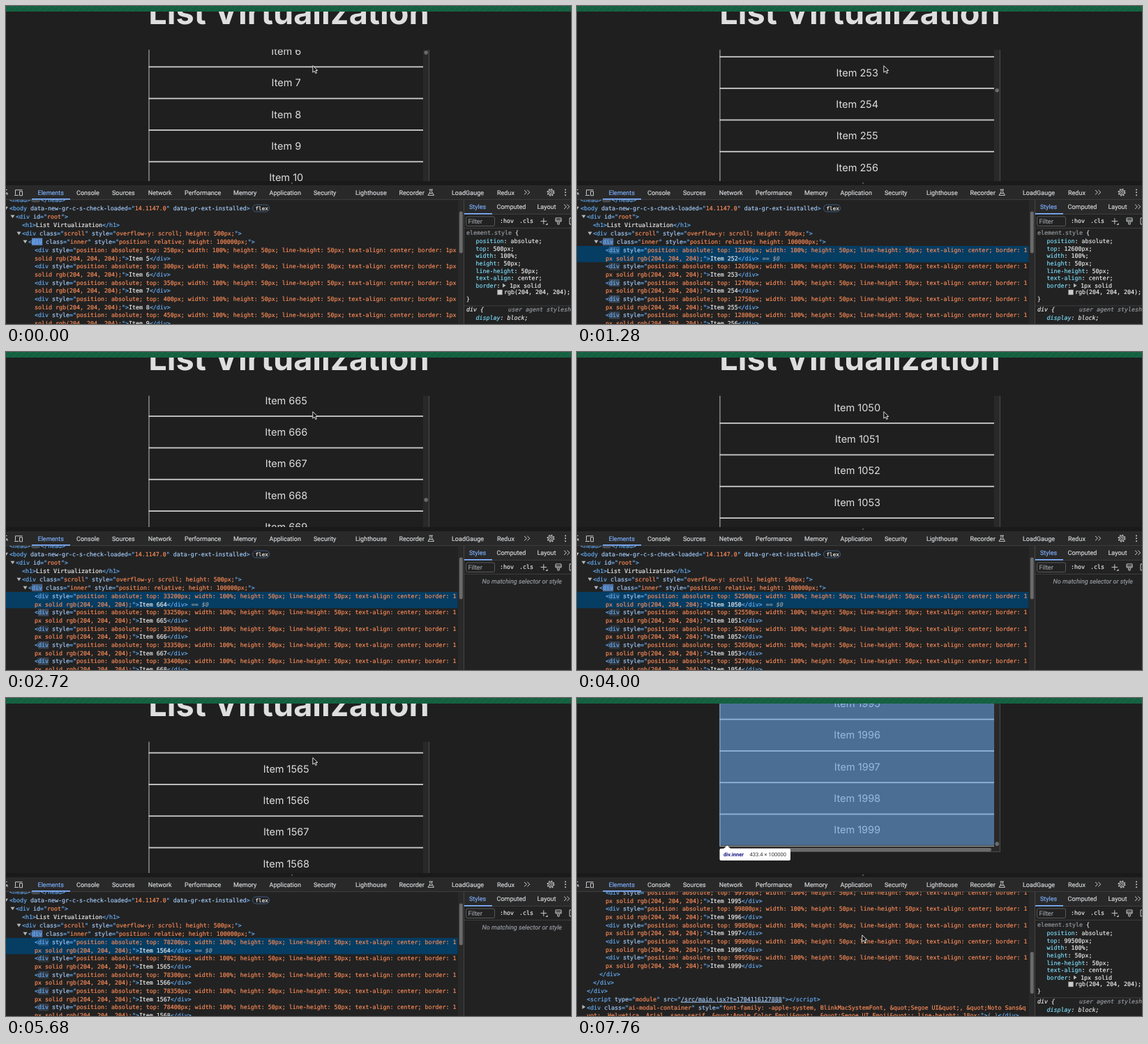
An HTML page for the animation above (7840 ms loop, 810 by 456 pixels).

```html
<!DOCTYPE html>
<html lang="en">
<head>
<meta charset="utf-8">
<title>List Virtualization</title>
<style>
  html, body { margin: 0; width: 100%; height: 100%; overflow: hidden; background: #1f1f1f; }
  svg { display: block; }
  text { white-space: pre; text-rendering: geometricPrecision; }
  .page { font-family: Inter, sans-serif; fill: #dedede; }
  .ui { font: 9.06px Roboto, sans-serif; --ink: #d6d8db; }
  .mono { font: 8.306px "DejaVu Sans Mono", monospace; --ink: #ededed; }
  .tag { --ink: #66aef7; }
  .attr { --ink: #a6cdfb; }
  .val { --ink: #fb8c59; }
  .prop { --ink: #7cdcf8; }
  .dim { --ink: #979ba0; }
  .link { --ink: #a6cdfb; text-decoration: underline; }
  .active { --ink: #7cacf8; }
  .ui, .mono, .mono tspan { fill: var(--ink); stroke: var(--ink); stroke-width: .18; }
  .it { font-style: italic; }
  .stroke { fill: none; stroke: #c7c9cc; stroke-width: 1; }
</style>
</head>
<body>
<svg id="stage" width="810" height="456" viewBox="0 0 810 456">
  <defs>
    <clipPath id="pageClip"><rect y="8" width="810" height="243"/></clipPath>
    <clipPath id="listClip"><rect id="listWindow" x="204" width="403" height="453.3"/></clipPath>
    <clipPath id="codeClip"><rect y="278" width="647.5" height="178"/></clipPath>
    <pattern id="weave" width="9" height="8" patternUnits="userSpaceOnUse">
      <path d="M0 8L9 0" stroke="#1b6b48" stroke-width="1"/>
    </pattern>
  </defs>
  <rect width="810" height="456" fill="#1f1f1f"/>
  <rect width="810" height="8" fill="#146040"/>
  <rect width="810" height="8" fill="url(#weave)"/>
  <g clip-path="url(#pageClip)">
    <g id="page">
      <text class="page" x="405.5" y="26.3" font-size="46.9" font-weight="700" text-anchor="middle">List Virtualization</text>
      <g id="list"></g>
    </g>
    <g id="overlay">
      <rect x="204.5" y="8" width="393.5" height="203.2" fill="#6aa3e5" opacity=".6"/>
      <path d="M210 216.5l5.3-5 5.3 5z" fill="#fff"/>
      <rect x="204.5" y="216" width="101.5" height="17" rx="2" fill="#fff"/>
      <text x="210" y="227.3" font-family="Roboto, sans-serif" font-size="7.6" font-weight="700" fill="#1a1a86">div.inner</text>
      <text x="247.5" y="227.3" font-family="Roboto, sans-serif" font-size="7.6" fill="#333">433.4 × 100000</text>
    </g>
  </g>
  <g id="panel"></g>
  <g clip-path="url(#codeClip)"><g id="code"></g></g>
  <rect id="codeThumb" x="649.8" width="5" height="60" rx="2.5" fill="#6a6a6a"/>
  <g id="styles"></g>
  <path id="cursor" d="M0 0V9.6L2.3 7.5L4 11L5.6 10.3L4.1 6.9H7Z" fill="#111" stroke="#f4f4f4" stroke-width=".9" stroke-linejoin="round"/>
</svg>
<script>
const LOOP = 7840, STEP = 80;
const PITCH = 45.33, LIST_TOP = 62.5, LAST_ITEM = 1999;
const ROW = 23.33, LINE = 12, COLUMNS = 121;

// time, list position in items, row offset of the element tree
const KEYS = [
  [0, 5.952, 0], [1280, 252.272, 0], [2720, 664.846, 0], [4000, 1049.625, 1],
  [4800, 1320.343, 0], [6640, 1822.857, -1], [7200, 1989.7, 1]
];

const $ = id => document.getElementById(id);
const clamp01 = x => Math.max(0, Math.min(1, x));
const mix = (a, b, p) => a + (b - a) * p;
const smooth = (t, from, to) => {
  const p = clamp01((t - from) / (to - from));
  return p * p * (3 - 2 * p);
};
const noise = n => {
  const v = Math.sin(n * 12.9898) * 43758.5453;
  return v - Math.floor(v);
};
const escapeText = s => s.replace(/&/g, '&amp;').replace(/</g, '&lt;');
const text = (cls, x, y, s, extra = '') => `<text class="${cls}" x="${x}" y="${y}" ${extra}>${escapeText(s)}</text>`;
const rect = (x, y, w, h, fill, extra = '') =>
  `<rect x="${x}" y="${y}" width="${w}" height="${h}" fill="${fill}" ${extra}/>`;
const path = (d, extra = 'class="stroke"') => `<path d="${d}" ${extra}/>`;
const arrowDown = (x, y) => path(`M${x - 3} ${y - 2}h6l-3 4.6z`, 'fill="#b4b7ba"');
const arrowRight = (x, y) => path(`M${x - 2} ${y - 3}v6l4.6-3z`, 'fill="#b4b7ba"');

function slope(i) {
  if (i === 0) return 0.06;
  if (i === KEYS.length - 1) return 0.29;
  const a = KEYS[i - 1], b = KEYS[i + 1];
  return (b[1] - a[1]) / (b[0] - a[0]);
}

function scrollAt(t) {
  const end = KEYS.length - 1;
  if (t >= KEYS[end][0]) return { pos: KEYS[end][1], lag: KEYS[end][2] };
  const i = KEYS.findIndex((k, n) => t < KEYS[n + 1][0]);
  const [t0, a, lagA] = KEYS[i], [t1, b, lagB] = KEYS[i + 1];
  const d = t1 - t0, p = (t - t0) / d, q = 1 - p;
  const pos = q * q * (1 + 2 * p) * a + p * q * q * d * slope(i)
    + p * p * (3 - 2 * p) * b - p * p * q * d * slope(i + 1);
  return { pos, lag: Math.round(mix(lagA, lagB, p)) };
}

// Markup as [class, text] tokens
const open = (name, attrs = {}) => [
  ['tag', '<' + name],
  ...Object.entries(attrs).flatMap(([key, value]) => value === null
    ? [['attr', ' ' + key]]
    : [['attr', ' ' + key], ['tag', '="'], [key === 'src' ? 'link' : 'val', value], ['tag', '"']]),
  ['tag', '>']
];
const close = name => [['tag', `</${name}>`]];

function codeLine(x, y, tokens, from = 0, to = Infinity) {
  let col = 0, spans = '';
  for (const [cls, s] of tokens) {
    const part = s.slice(Math.max(0, from - col), Math.max(0, to - col));
    if (part) spans += `<tspan class="${cls}">${escapeText(part)}</tspan>`;
    col += s.length;
  }
  return `<text class="mono" x="${x}" y="${y + 2.9}">${spans}</text>`;
}

function wrapped(x, y, tokens, columns) {
  const whole = tokens.map(k => k[1]).join('');
  const next = columns + (whole[columns] === ' ' ? 1 : 0);
  return codeLine(x, y, tokens, 0, columns) + codeLine(x, y + 11.67, tokens, next);
}

function treeRow(item, y, selected, flash) {
  const style = `position: absolute; top: ${item * 50}px; width: 100%; height: 50px; line-height: 50px; ` +
    'text-align: center; border: 1px solid rgb(204, 204, 204);';
  const tokens = [...open('div', { style }), ['', 'Item ' + item], ...close('div')];
  if (selected) tokens.push(['dim it', ' == $0']);
  return (selected ? rect(0, y - 6, 648, ROW, '#053d63') : '')
    + (flash ? rect(46, y - 5, 15.2, 10.4, '#6f95c8', `opacity="${flash}"`) : '')
    + wrapped(41, y, tokens, COLUMNS);
}

function drawCode(t, first, scrolled) {
  const active = t < 7280;
  let out = codeLine(5, 277.7, [...open('head'), ['', '   '], ...close('head')])
    + rect(36, 274, 13, 7.5, '#4a4d51', 'rx="3.5"')
    + arrowDown(0, 289.7)
    + codeLine(5, 289.7, open('body', { 'data-new-gr-c-s-check-loaded': '14.1147.0', 'data-gr-ext-installed': null }))
    + rect(353.5, 285, 24, 10, 'none', 'rx="5" stroke="#476a9e" stroke-width=".8"')
    + text('mono', 357.5, 292.7, 'flex', 'style="font-size:7.6px"')
    + arrowDown(9.5, 301.7) + codeLine(14, 301.8, open('div', { id: 'root' }))
    + codeLine(23, 313.8, [...open('h1'), ['', 'List Virtualization'], ...close('h1')])
    + arrowDown(18.5, 325.8)
    + codeLine(23, 325.9, open('div', { class: 'scroll', style: 'overflow-y: scroll; height: 500px;' }))
    + arrowDown(27.5, 337.8)
    + (active ? rect(37, 332.8, 15.2, 10.4, '#6292d6', `opacity="${t ? 0.5 + 0.3 * noise(t) : 0.9}"`) : '')
    + codeLine(32, 338, open('div', { class: 'inner', style: 'position: relative; height: 100000px;' }));

  const selected = Math.max(first, 10);
  const last = Math.min(LAST_ITEM, first + 13);
  let y = 350;
  for (let item = first; item <= last; item++, y += ROW) {
    const flash = active && first > 10 ? 0.1 + 0.25 * noise(t / STEP + (item - first) * 7) : 0;
    out += treeRow(item, y, item === selected, flash);
  }
  if (last === LAST_ITEM) {
    [32, 23, 14].forEach((x, i) => out += codeLine(x, y + i * LINE, close('div')));
    y += 3 * LINE;
    out += codeLine(14, y, [...open('script', { type: 'module', src: '/src/main.jsx?t=1704116127888' }), ...close('script')]);
    y += LINE;
    const fonts = 'font-family: -apple-system, BlinkMacSystemFont, &quot;Segoe UI&quot;, &quot;Noto Sans&quot;, ' +
      'Helvetica, Arial, sans-serif, &quot;Apple Color Emoji&quot;, &quot;Segoe UI Emoji&quot;; line-height: 18px;';
    out += arrowRight(9.5, y - 1)
      + wrapped(14, y, [...open('div', { class: 'ai-modal-container', style: fonts }), ['dim', '(…)'], ...close('div')], 126);
  }
  $('code').innerHTML = out;
  $('code').setAttribute('transform', `translate(0 ${-scrolled * 187.4})`);
  $('codeThumb').setAttribute('y', mix(294.5, 364, scrolled));
}

function drawList(pos) {
  const bottom = LIST_TOP + 453.3;
  let out = rect(597.8, LIST_TOP, 9, 458.5, '#292929') + rect(204.5, bottom - 8, 402, 8, '#292929');
  const start = Math.floor(pos) - 1;
  for (let item = start; item <= Math.min(LAST_ITEM, start + 13); item++) {
    const y = LIST_TOP + (item - pos) * PITCH;
    const border = item === LAST_ITEM ? rect(204.5, y + 22.6, 393.5, 0.95, '#c8c8c8') : rect(204.5, y + 21.7, 393.5, 1.85, '#c8c8c8');
    out += border + text('page', 401.7, y + 5.2, 'Item ' + item, 'font-size="14.5" text-anchor="middle"');
  }
  out += rect(204.5, LIST_TOP, 0.95, 444.5, '#c8c8c8')
    + rect(209, bottom - 6, 385, 5, '#6a6a6a', 'rx="2.5"')
    + path(`M606.4 ${LIST_TOP}V${bottom - 0.4}H204.5`, 'fill="none" stroke="#555" stroke-width=".9"')
    + `<circle cx="602.2" cy="${65.4 + pos * 0.2204}" r="2.8" fill="#6a6a6a"/>`;
  $('list').innerHTML = `<g clip-path="url(#listClip)">${out}</g>`;
}

function drawStyles(visible, item) {
  if (!visible) {
    $('styles').innerHTML = text('ui it dim', 682.5, 331.7, 'No matching selector or style');
    return;
  }
  const rules = [['position', 'absolute'], ['top', item * 50 + 'px'], ['width', '100%'],
    ['height', '50px'], ['line-height', '50px'], ['text-align', 'center']];
  const declaration = (x, y, [name, value], cls = '') =>
    `<text class="mono ${cls}" x="${x}" y="${y}"><tspan class="prop">${name}</tspan>: ${value};</text>`;
  $('styles').innerHTML =
    `<text class="mono" x="660" y="328"><tspan class="dim">element.style</tspan> {</text>`
    + rules.map((rule, i) => declaration(673.5, 340.1 + i * 10.6, rule)).join('')
    + '<text class="mono" x="673.5" y="403.7"><tspan class="prop">border</tspan>:</text>'
    + arrowRight(714, 400.8) + text('mono', 722, 403.7, '1px solid')
    + rect(704.5, 407, 7, 7, '#ccc', 'stroke="#888" stroke-width=".5"')
    + text('mono', 714, 413.4, 'rgb(204, 204, 204);')
    + text('mono', 660, 423.3, '}')
    + rect(657, 429.5, 153, 0.8, '#444')
    + text('mono it', 660, 438.4, 'div {')
    + text('mono it dim', 720, 438.4, 'user agent stylesheet')
    + declaration(673.5, 450, ['display', 'block'], 'it');
}

function drawPanel() {
  const tabs = [['Elements', 45.5], ['Console', 101], ['Sources', 152], ['Network', 203.8], ['Performance', 256],
    ['Memory', 326], ['Application', 377.5], ['Security', 441], ['Lighthouse', 501], ['Recorder', 563.5],
    ['LoadGauge', 639], ['Redux', 704]];
  const chevrons = (x, y) => path(`M${x} ${y - 3.2}l3.4 3.2l-3.4 3.2m4.4-6.4l3.4 3.2l-3.4 3.2`);
  $('panel').innerHTML = rect(0, 251, 810, 205, '#222')
    + rect(0, 251, 810, 6, '#1a1a1a') + '<circle cx="410" cy="254" r="1.2" fill="#555"/>'
    + rect(0, 257, 810, 21, '#292929') + rect(0, 277.3, 810, 0.8, '#444')
    + path('M-1 263.5h2.6M-1 271l3-3m-3 0h3v3')
    + path('M13.5 270.5v-6.7h10M12 271.5h6M19.5 265.8h4v6h-4z')
    + tabs.map(([name, x], i) => text(i ? 'ui' : 'ui active', x, 270.7, name)).join('')
    + rect(37, 276, 55, 1.8, '#7cacf8')
    + path('M606.5 263.2h5.5M608 263.2v3.2l-3 5h8.5l-3-5v-3.2M607 268.5h4.5')
    + chevrons(743, 267.2)
    + '<circle class="stroke" cx="781" cy="267.3" r="1.7"/><circle class="stroke" cx="781" cy="267.3" r="3.7"/>'
    + '<circle class="stroke" cx="781" cy="267.3" r="4.8" style="stroke-dasharray:1.8 1.97;stroke-width:1.4"/>'
    + [263.4, 267.3, 271.2].map(y => `<circle cx="802" cy="${y}" r="1" fill="#c7c9cc"/>`).join('')
    + rect(648, 278, 8, 178, '#292929') + rect(656, 278, 0.9, 178, '#4a4a4a')
    + rect(657, 278, 153, 20, '#292929') + rect(657, 298, 153, 0.8, '#444')
    + text('ui active', 664, 291, 'Styles') + rect(657, 297, 40, 1.8, '#7cacf8')
    + text('ui', 703.5, 291, 'Computed') + text('ui', 761.5, 291, 'Layout') + chevrons(800, 287.8)
    + rect(659.5, 302, 41, 13.5, '#222', 'rx="2" stroke="#666" stroke-width=".8"')
    + text('ui dim', 662.5, 312, 'Filter')
    + text('mono', 708, 311.3, ':hov') + text('mono', 736, 311.3, '.cls')
    + path('M766.5 308.6h8.6M770.8 304.3v8.6') + path('M776.5 311v3h-3z', 'fill="#c7c9cc"')
    + path('M788 304h8v5h-8zM788 307h8M790.8 309v4h2.4v-4') + path('M811 304h-3v9h3')
    + rect(657, 318, 153, 0.8, '#444');
}

function render(time) {
  const t = Math.floor((time % LOOP) / STEP) * STEP;
  const { pos, lag } = scrollAt(t);
  const first = Math.floor(pos) + lag;
  const pageShift = -294.8 * smooth(t, 7200, 7440);
  const reach = smooth(t, 7360, 7600);

  $('page').setAttribute('transform', `translate(0 ${pageShift})`);
  drawList(pos);
  drawCode(t, first, smooth(t, 7600, 7760));
  drawStyles(t < 1600 || t >= 7280, Math.max(first, 10));
  $('overlay').style.display = t >= 7600 ? '' : 'none';
  $('cursor').setAttribute('transform', `translate(${mix(439.8, 408.8, reach)} ${mix(85.6, 340, reach)})`);
}

$('listWindow').setAttribute('y', LIST_TOP);
drawPanel();
const started = performance.now();
let shown = -1;
function tick() {
  const elapsed = performance.now() - started;
  const step = Math.floor(elapsed / STEP);
  if (step !== shown) {
    shown = step;
    render(elapsed);
  }
  requestAnimationFrame(tick);
}
tick();
</script>
</body>
</html>
```
